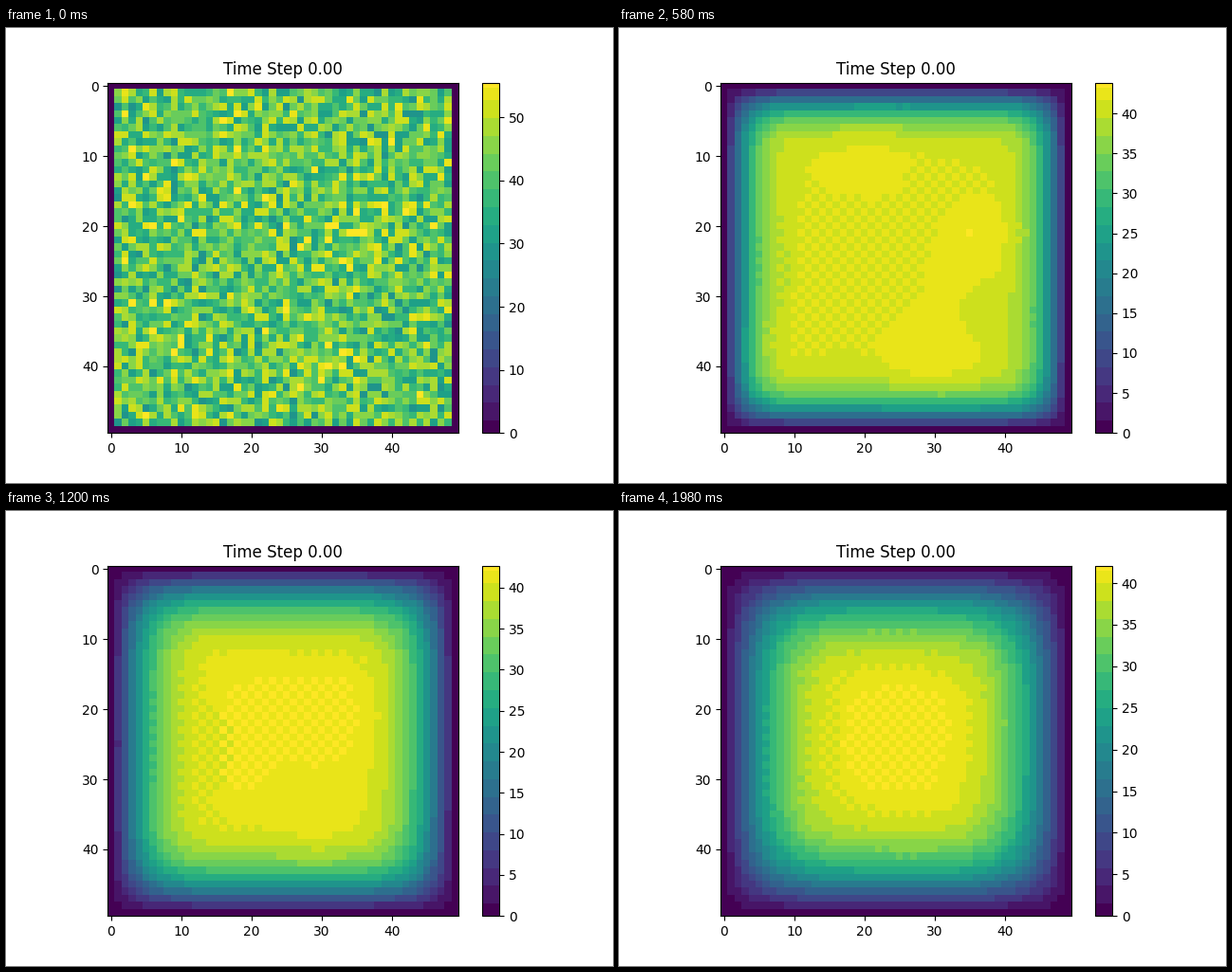
Write a matplotlib script that moves like this. It is 640 px wide and 480 px high and loops after 2 s.

```python
import numpy as np
import matplotlib.pyplot as plt
from matplotlib.animation import FuncAnimation
from matplotlib.colors import ListedColormap

SIZE, STEPS = 50, 100
LOW, HIGH, MEAN = 28.5, 55.5, 41.7

# (column, row, spread, strength)
PATCHES = [(30, 40, 3.5, 4), (36, 22, 3.5, 3), (6, 37, 3, 2.5),
           (20, 9, 4, 2), (40, 33, 3, -2.5), (7, 27, 3, -2)]
CHECKS = [(14, 26, 5, 2), (31, 17, 4, 1)]


def bumps(spots, x, y):
    return sum(a * np.exp(-((x - cx) ** 2 + (y - cy) ** 2) / (2 * s * s))
               for cx, cy, s, a in spots)


def average(u):
    """Mean of the four neighbours, wrapping at the edges."""
    return sum(np.roll(u, s, axis) for s in (-1, 1) for axis in (0, 1)) / 4


def initial_plate():
    """Uniform noise, nudged so that it settles into a few broad patches."""
    y, x = np.mgrid[1:SIZE - 1, 1:SIZE - 1]
    parity = np.where((x + y) % 2, 1, -1)
    goal = bumps(PATCHES, x, y) + parity * bumps(CHECKS, x, y)
    goal += MEAN - goal.mean()
    inner = np.random.default_rng(7).uniform(LOW, HIGH, x.shape)
    for _ in range(2):
        settled = inner
        for _ in range(8):
            settled = average(settled)
        inner = np.clip(inner + goal - settled, LOW, HIGH)
    return np.pad(inner, 1)


def solve():
    """Explicit heat equation at its stability limit, edges held at zero."""
    plates = np.zeros((STEPS, SIZE, SIZE))
    plates[0] = initial_plate()
    for k in range(1, STEPS):
        plates[k, 1:-1, 1:-1] = average(plates[k - 1])[1:-1, 1:-1]
    return plates


def banded_viridis():
    edges = np.append(np.linspace(0.033, 0.95, 19), 0.985)
    mids = np.concatenate([[0], (edges[:-1] + edges[1:]) / 2, [1]])
    band = np.digitize(np.linspace(0, 1, 256), edges)
    return ListedColormap(plt.get_cmap("viridis")(mids[band]))


def peak(k):
    """Top of the colour scale, falling along a logarithmic time axis."""
    return np.interp(np.log1p(k), np.log1p([0, 7, 19, 39, 99]),
                     [HIGH, 46.9, 44.8, 43.2, 42.1])


plates = solve()
fig = plt.figure(figsize=(6.4, 4.8), dpi=100)
image = plt.imshow(plates[0], cmap=banded_viridis(), vmin=0, vmax=peak(0))
plt.colorbar(image)
plt.title("Time Step 0.00")


def update(k):
    image.set_data(plates[k])
    image.set_clim(0, peak(k))
    return [image]


anim = FuncAnimation(fig, update, frames=STEPS, interval=20,
                     repeat=True, repeat_delay=0, blit=False)
plt.show()
```
